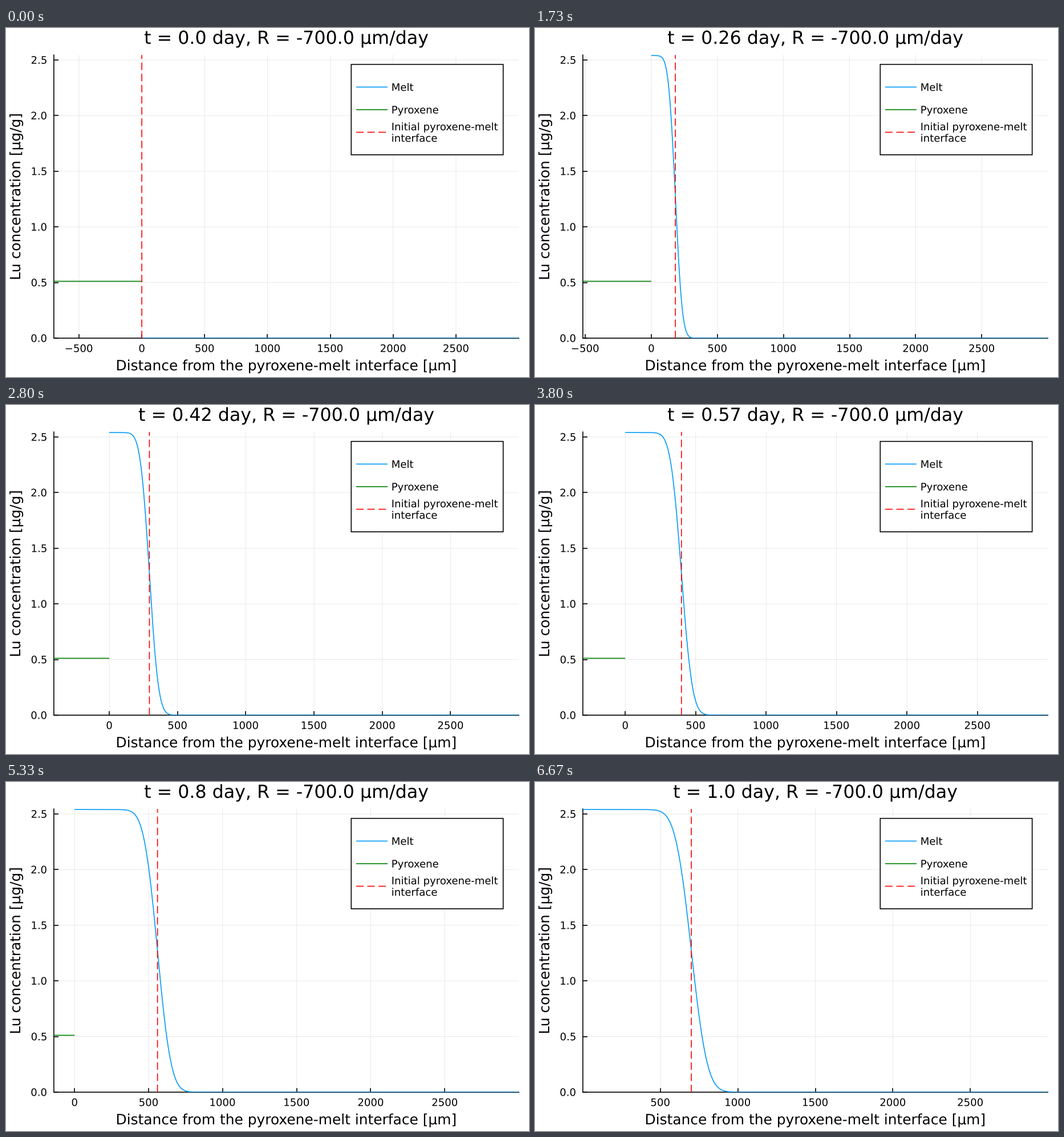
A matplotlib script for the animation above (6.74 s loop, 917x611 px).

```python
import math

import matplotlib.pyplot as plt
import numpy as np
from matplotlib.animation import FuncAnimation
from matplotlib.lines import Line2D
from matplotlib.patches import PathPatch, Rectangle
from matplotlib.textpath import TextPath
from matplotlib.transforms import Affine2D

W, H, DPI = 917, 611, 64
LOOP_MS, STEPS = 6740, 101
TICKS_PER_STEP = 2   # timer ticks per time step
FRAMES = STEPS * TICKS_PER_STEP

# Plot area in pixels, measured from the top left corner
LEFT, RIGHT, TOP, BOTTOM = 83.9, 899.1, 47.2, 543.0

RATE = 700.0         # dissolution rate, um/day
DIFF = 3300.0        # diffusivity in the melt, um^2/day
X_END = 3000.0
Y_END = 2.545
C_MELT, C_SOLID = 2.54, 0.511

BLUE, GREEN, RED = "#009afa", "#008000", "#ff0000"
TICK_SIZE, LABEL_SIZE, TITLE_SIZE = 18.1, 24.88, 31.68
CAP_HALF = 6.6       # half the height of a tick digit
DASH = (0, (8, 4))


def px(n):
    """Pixels to points."""
    return n * 72 / DPI


LINE = px(1.63)

plt.rcParams.update({
    "font.family": "DejaVu Sans",
    "path.snap": False,
    "lines.solid_capstyle": "butt",
    "lines.dash_capstyle": "butt",
    "toolbar": "None",
})

fig = plt.figure(figsize=(W / DPI, H / DPI), dpi=DPI, facecolor="white")
ax = fig.add_axes([LEFT / W, 1 - BOTTOM / H,
                   (RIGHT - LEFT) / W, (BOTTOM - TOP) / H])
pixels = Affine2D().scale(1 / DPI) + fig.dpi_scale_trans


def outline(text, size, ha="left", turn=0):
    """Text outline in pixels, aligned on its inked width."""
    path = TextPath((0, 0), text, size=size)
    box = path.get_extents()
    shift = {"left": 0, "center": -(box.x0 + box.x1) / 2, "right": -box.x1}[ha]
    return Affine2D().translate(shift, 0).rotate_deg(turn).transform_path(path)


def place(patch, x, y):
    patch.set_transform(Affine2D().translate(x, H - y) + pixels)


def label(x, y, *args, **kw):
    """Text with its baseline at a sub-pixel position."""
    patch = PathPatch(outline(*args, **kw), facecolor="black", linewidth=0,
                      zorder=3)
    place(patch, x, y)
    return fig.add_artist(patch)


def setup_axes():
    ax.set_ylim(0, Y_END)
    ax.set_yticks(np.arange(0, 2.6, 0.5))
    ax.set_axisbelow(True)
    ax.grid(color="black", alpha=0.1, linewidth=px(0.82))
    ax.tick_params(direction="in", length=px(7.5), width=LINE,
                   labelleft=False, labelbottom=False)
    for side, spine in ax.spines.items():
        spine.set_linewidth(LINE)
        spine.set_visible(side in ("left", "bottom"))
    for v in np.arange(0, 2.6, 0.5):
        y = BOTTOM - v / Y_END * (BOTTOM - TOP)
        label(70.8, y + CAP_HALF, f"{v:.1f}", TICK_SIZE, ha="right")

    mid_x, mid_y = (LEFT + RIGHT) / 2, (TOP + BOTTOM) / 2
    label(mid_x, 599.3, "Distance from the pyroxene-melt interface [µm]",
          LABEL_SIZE, ha="center")
    label(25, mid_y, "Lu concentration [µg/g]", LABEL_SIZE, ha="center", turn=90)
    return label(mid_x, 27.8, "t", TITLE_SIZE, ha="center")


def setup_legend():
    x0, y0, x1, y1 = 605.3, 63.7, 871.7, 222.0
    fig.add_artist(Rectangle((x0 / W, 1 - y1 / H), (x1 - x0) / W, (y1 - y0) / H,
                             transform=fig.transFigure, facecolor="white",
                             edgecolor="black", linewidth=LINE))
    rows = [
        (103.4, BLUE, "-", ["Melt"]),
        (143.0, GREEN, "-", ["Pyroxene"]),
        (182.5, RED, DASH, ["Initial pyroxene-melt", "interface"]),
    ]
    for y, color, style, lines in rows:
        fig.add_artist(Line2D([614 / W, 669 / W], [1 - y / H] * 2,
                              transform=fig.transFigure, color=color,
                              linestyle=style, linewidth=LINE))
        for i, text in enumerate(lines):
            dy = (i - (len(lines) - 1) / 2) * 20
            label(675.7, y + dy + CAP_HALF, text, TICK_SIZE)


erfc = np.vectorize(math.erfc)


def melt_profile(x, t):
    """Diffusive step centred on the initial interface."""
    if t == 0:
        return np.zeros_like(x)
    return C_MELT / 2 * erfc((x - RATE * t) / (2 * math.sqrt(DIFF * t)))


title = setup_axes()
setup_legend()

xs = np.linspace(0, X_END, 1501)
melt, = ax.plot(xs, np.zeros_like(xs), color=BLUE, linewidth=LINE, zorder=3)
ax.plot([-RATE, 0], [C_SOLID, C_SOLID], color=GREEN, linewidth=LINE, zorder=3)
front, = ax.plot([0, 0], [0, Y_END], color=RED, linewidth=LINE,
                 linestyle=DASH, zorder=4)

x_labels = {
    v: label(0, 0, str(v).replace("-", "\u2212"), TICK_SIZE, ha="center")
    for v in range(-500, 2501, 500)
}


def update(frame):
    step = min((frame + 1) // TICKS_PER_STEP, STEPS - 1)
    t = step / 100
    start = -700 + 7 * step
    ax.set_xlim(start, X_END)
    ax.set_xticks([v for v in x_labels if v > start])
    for v, patch in x_labels.items():
        x = LEFT + (v - start) / (X_END - start) * (RIGHT - LEFT)
        place(patch, x, 567.2)
        patch.set_visible(v > start)
    melt.set_ydata(melt_profile(xs, t))
    front.set_xdata([RATE * t, RATE * t])
    title.set_path(outline(f"t = {t} day, R = {-RATE} µm/day",
                           TITLE_SIZE, ha="center"))
    return melt, front, title


anim = FuncAnimation(fig, update, frames=FRAMES, interval=LOOP_MS / FRAMES,
                     repeat=True, repeat_delay=0, blit=False)
plt.show()
```
